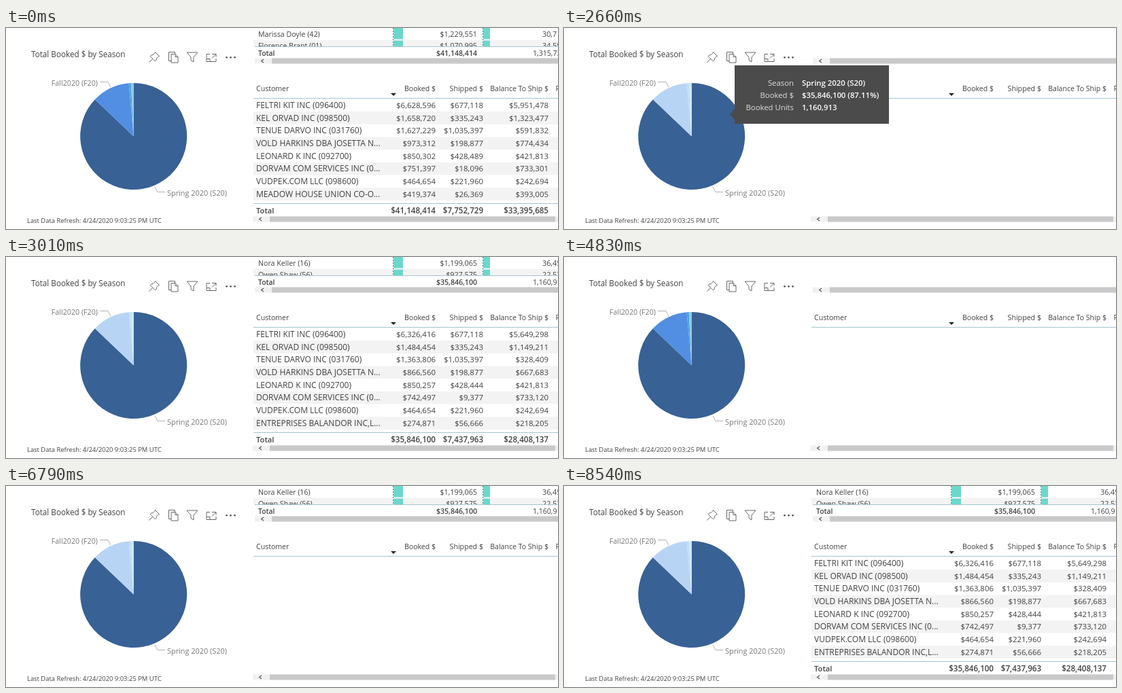
An HTML page that plays this animation: 812x296 px, repeating every 8610 ms.

```html
<!DOCTYPE html>
<html lang="en">
<head>
<meta charset="utf-8">
<title>Bookings dashboard</title>
<style>
html, body { margin: 0; width: 100%; height: 100%; overflow: hidden; background: #fff; }
svg { display: block; width: 812px; height: 296px; font-family: "Open Sans", "Noto Sans", sans-serif; }
</style>
</head>
<body>
<svg id="stage" viewBox="0 0 812 296"></svg>
<script>
const LOOP = 8610, STEP = 70;
const INK = '#404040', RULE = '#a3c4d2';

const text = (x, y, s, size, { fill = INK, end = false, bold = false } = {}) =>
  `<text x="${x}" y="${y}" font-size="${size}" fill="${fill}"` +
  `${end ? ' text-anchor="end"' : ''}${bold ? ' font-weight="600"' : ''}>${s}</text>`;
const rect = (x, y, w, h, fill) =>
  `<rect x="${x}" y="${y}" width="${w}" height="${h}" fill="${fill}"/>`;
const line = (d, color, width = 1) =>
  `<path d="${d}" fill="none" stroke="${color}" stroke-width="${width}"/>`;

// Pie: slices as [from, to, normal RGB, dimmed RGB]
const PIE = { x: 187.7, y: 159.5, r: 78.5 };
const slices = [
  [0, .8711, [56, 97, 149], [56, 97, 149]],
  [.8711, .9855, [82, 142, 226], [184, 212, 245]],
  [.9855, .992, [79, 163, 224], [190, 222, 245]],
  [.992, 1, [140, 200, 226], [206, 233, 243]]
];
function wedge([from, to]) {
  const at = f => {
    const a = 2 * Math.PI * f;
    return `${PIE.x + PIE.r * Math.sin(a)} ${PIE.y - PIE.r * Math.cos(a)}`;
  };
  return `<path class="slice" d="M${PIE.x} ${PIE.y}L${at(from)}` +
    `A${PIE.r} ${PIE.r} 0 ${+(to - from > .5)} 1 ${at(to)}Z"/>`;
}

const icons = [
  [218, 43, 'M1.5-7.5L7.5-1.5L6-.8L3.5 1.8Q3.5 4.5 1.5 6L-6-1.5Q-4.5-3.5-1.8-3.5L.8-6ZM-2.3 2.3L-7.5 7.5'],
  [246, 43, 'M-3 5.5H-6.5V-7.5H2.5V-5M-3-4.5H3L7-.5V8H-3ZM3-4.5V-.5H7'],
  [274, 43, 'M-8-7H8L2 0V7L-2 4.5V0Z'],
  [302, 44, 'M-2-5.5H-7V5.5H7V1M1-5.5H7V-1.5M7-5.5L1 .5M-7 1.5H-2V5.5']
];

function chart() {
  const label = '#777';
  return text(37, 43, 'Total Booked $ by Season', 11.7) +
    icons.map(([x, y, d]) => `<g transform="translate(${x} ${y})">${line(d, '#666')}</g>`).join('') +
    [324.5, 330.5, 336.5].map(x => `<circle cx="${x}" cy="43.3" r="1.4" fill="#555"/>`).join('') +
    slices.map(wedge).join('') +
    line('M138 79.5H150L154 87M219 234L223 241.5H234', '#b0b0b0') +
    text(135, 85, 'Fall2020 (F20)', 10.7, { fill: label, end: true }) +
    text(237, 247, 'Spring 2020 (S20)', 10.9, { fill: label }) +
    text(31, 286.5, 'Last Data Refresh: 4/24/2020 9:03:25 PM UTC', 9.42);
}

function scrollbar(x, y, thumb, right) {
  return rect(x, y, 812 - x, 8, '#f1f1f1') + rect(thumb, y, right - thumb, 8, '#c9c9c9') +
    line(`M${x + 13} ${y + 1.5}L${x + 9.5} ${y + 4}L${x + 13} ${y + 6.5}`, '#505050', 1.1);
}

function tableFrame() {
  const head = { end: true };
  return scrollbar(366, 44.5, 391, 812) + scrollbar(363, 277.5, 388, 808) +
    text(368, 93, 'Customer', 10.55) +
    text(632, 93, 'Booked $', 10.55, head) +
    text(702, 93, 'Shipped $', 10.65, head) +
    text(798, 93, 'Balance To Ship $', 10.55, head) +
    text(808.5, 93, 'P', 10.55) +
    '<path d="M566 96H574L570 100Z" fill="#222"/>' +
    line('M364 103.5H812', RULE);
}

const customers = ['FELTRI KIT INC (096400)', 'KEL ORVAD INC (098500)', 'TENUE DARVO INC (031760)',
  'VOLD HARKINS DBA JOSETTA N...', 'LEONARD K INC (092700)', 'DORVAM COM SERVICES INC (0...',
  'VUDPEK.COM LLC (098600)'];

const views = {
  all: {
    reps: [['Marissa Doyle (42)', '$1,229,551', '30,7'], ['Florence Brant (01)', '$1,070,995', '34,55']],
    repTotal: ['$41,148,414', '1,315,73'],
    last: 'MEADOW HOUSE UNION CO-O...',
    rows: `6,628,596 677,118 5,951,478|1,658,720 335,243 1,323,477|1,627,229 1,035,397 591,832|
      973,312 198,877 774,434|850,302 428,489 421,813|751,397 18,096 733,301|
      464,654 221,960 242,694|419,374 26,369 393,005`,
    total: '41,148,414 7,752,729 33,395,685'
  },
  spring: {
    reps: [['Nora Keller (16)', '$1,199,065', '36,45'], ['Owen Shaw (56)', '$927,575', '22,53']],
    repTotal: ['$35,846,100', '1,160,91'],
    last: 'ENTREPRISES BALANDOR INC,L...',
    rows: `6,326,416 677,118 5,649,298|1,484,454 335,243 1,149,211|1,363,806 1,035,397 328,409|
      866,560 198,877 667,683|850,257 428,444 421,813|742,497 9,377 733,120|
      464,654 221,960 242,694|274,871 56,666 218,205`,
    total: '35,846,100 7,437,963 28,408,137'
  }
};

function upperTable({ reps, repTotal }) {
  const rows = reps.map(([name, booked, units], i) => {
    const y = 13 + i * 16.5;
    const bars = [[570, 14], [702, 10]].map(([x, w]) =>
      rect(x, i ? 18.5 : 0, w, 16.5, '#6bd8cb') +
      `<path d="M${x - .5} 0V27" stroke="#3d8f88" stroke-dasharray="2 2"/>`).join('');
    return (i ? rect(364, 17.5, 448, 10, '#f3f3f3') : '') + bars +
      text(371, y, name, 10.65) + text(693, y, booked, 10.8, { end: true }) + text(789, y, units, 10.8);
  }).join('');
  return `<g clip-path="url(#reps)">${rows}</g>` + line('M366 27.5H812', RULE) +
    text(371, 41.3, 'Total', 10.4, { bold: true }) +
    text(693, 41.3, repTotal[0], 10.6, { bold: true, end: true }) +
    text(775, 41.3, repTotal[1], 10.6);
}

function lowerTable({ rows, last, total }) {
  const cells = (list, y, size, bold) => list.trim().split(' ').map((n, i) =>
    text([632, 702, 798][i], y, '$' + n, size, { end: true, bold })).join('');
  const body = rows.split('|').map((row, i) => {
    const y = 118 + i * 18.68;
    return (i % 2 ? rect(364, y - 13.5, 448, 18.7, '#f3f3f3') : '') +
      text(368, y, customers[i] || last, 12) + cells(row, y, 11.45);
  }).join('');
  return body + line('M364 258.5H812', RULE) +
    text(368, 273, 'Total', 11.2, { bold: true }) + cells(total, 273, 11.6, true);
}

function tooltip() {
  const rows = [['Season', 'Spring 2020 (S20)'], ['Booked $', '$35,846,100 (87.11%)'], ['Booked Units', '1,160,913']];
  return rect(251, 55, 227, 86, '#4b4b4b') + '<path d="M251.5 119L244 127L251.5 135Z" fill="#4b4b4b"/>' +
    rows.map(([key, value], i) =>
      text(338, 85 + 18 * i, key, 11.35, { fill: '#dedede', end: true }) +
      text(350, 85 + 18 * i, value, 11.35, { fill: '#fff', bold: true })).join('');
}

const stage = document.getElementById('stage');
stage.innerHTML = '<clipPath id="reps"><rect x="364" width="448" height="27"/></clipPath>' +
  chart() + tableFrame() +
  Object.entries(views).map(([key, v]) =>
    `<g id="upper-${key}">${upperTable(v)}</g><g id="lower-${key}">${lowerTable(v)}</g>`).join('') +
  `<g id="tip">${tooltip()}</g>`;

const sliceNodes = stage.querySelectorAll('.slice');
const tip = document.getElementById('tip');

// Visible view by start time
const schedule = {
  upper: [[0, 'all'], [2590, ''], [2870, 'spring'], [4760, ''], [4900, 'all'], [6580, ''], [6790, 'spring']],
  lower: [[0, 'all'], [2590, ''], [2940, 'spring'], [4760, ''], [4970, 'all'], [6580, ''], [6860, 'spring']]
};
const ramp = (t, from, to) => Math.min(1, Math.max(0, (t - from) / (to - from)));

function draw(time) {
  const t = Math.floor(time % LOOP / STEP) * STEP;
  const dim = ramp(t, 2380, 2590) - ramp(t, 4620, 4830) + ramp(t, 6370, 6580);
  slices.forEach(([, , normal, dimmed], i) => {
    const rgb = normal.map((c, k) => Math.round(c + (dimmed[k] - c) * dim));
    sliceNodes[i].setAttribute('fill', `rgb(${rgb})`);
  });
  for (const part in schedule) {
    const current = schedule[part].filter(([start]) => t >= start).pop()[1];
    for (const key in views)
      document.getElementById(`${part}-${key}`).style.display = key === current ? '' : 'none';
  }
  tip.style.opacity = ramp(t, 2380, 2520) - ramp(t, 2730, 2870);
}

const begin = performance.now();
function frame() {
  draw(performance.now() - begin);
  requestAnimationFrame(frame);
}
frame();
</script>
</body>
</html>
```
